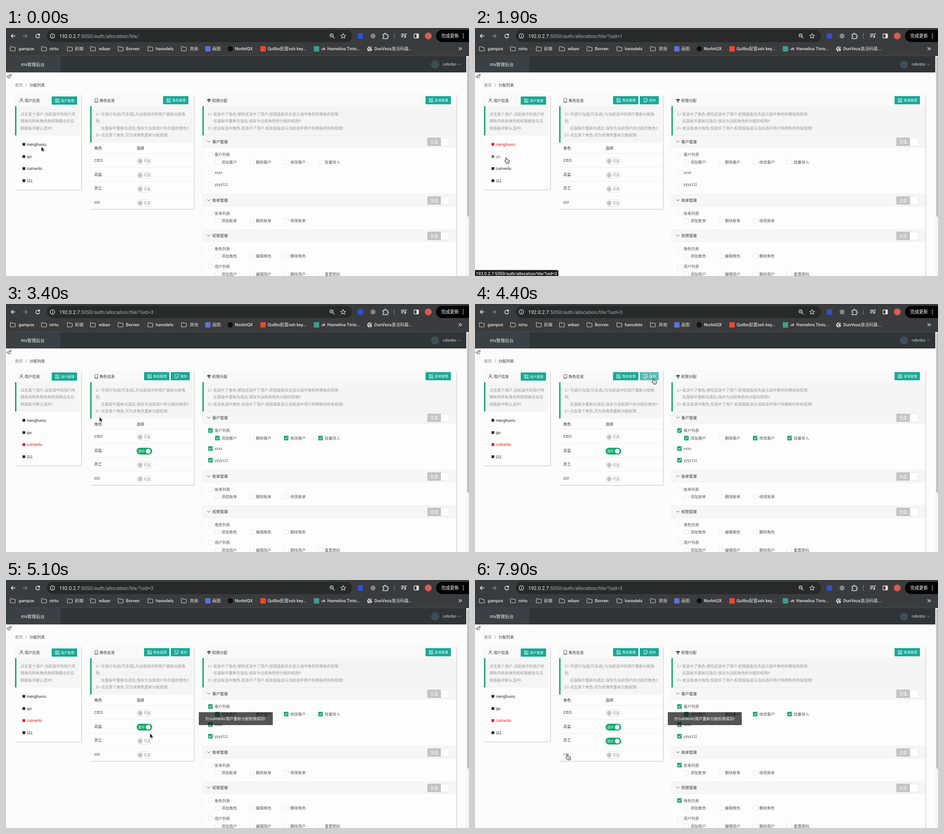
Recreate the animation shown at these times as an HTML page. Size 1023x547 px, loop 8 s.

```html
<!DOCTYPE html>
<html lang="zh">
<head>
<meta charset="utf-8">
<title>分配列表</title>
<style>
html, body { margin: 0; width: 100%; height: 100%; overflow: hidden; background: #fcfcfc; }
svg { display: block; width: 100vw; height: 100vh; }
text { font-family: "Liberation Sans", "Noto Sans CJK SC", "Noto Sans CJK", sans-serif; white-space: pre; }
.ui { font-family: Roboto, "Noto Sans CJK SC", "Noto Sans CJK", sans-serif; }
.card { filter: drop-shadow(1px 1px 1px rgba(0, 0, 0, .22)); }
</style>
</head>
<body>
<svg viewBox="0 0 1023 547" preserveAspectRatio="none">
  <g id="base"></g>
  <g id="live"></g>
  <g id="toast"></g>
  <g id="status"></g>
  <g id="cursor"></g>
</svg>
<script>
const LOOP = 8000;
const HOST = '192.0.2.7', PATH = ':5050/auth/allocation/tile/';
const GREEN = '#16a86b', TEAL = '#17a995', INK = '#333';
const $ = id => document.getElementById(id);

// ---- drawing helpers: each returns SVG markup ----
const text = (x, cy, s, fill = INK, size = 8.5, extra = '') =>
  `<text x="${x}" y="${(cy + size * .37).toFixed(2)}" font-size="${size}" fill="${fill}" ${extra}>${s}</text>`;
const ui = (x, cy, s, fill, size, weight = 500) =>
  text(x, cy, s, fill, size, `class="ui" font-weight="${weight}"`);
const rect = (x, y, w, h, fill, extra = '') =>
  `<rect x="${x}" y="${y}" width="${w}" height="${h}" fill="${fill}" ${extra}/>`;
const dot = (x, y, r, fill, extra = '') =>
  `<circle cx="${x}" cy="${y}" r="${r}" fill="${fill}" ${extra}/>`;
const line = (d, color, w = 1) =>
  `<path d="${d}" fill="none" stroke="${color}" stroke-width="${w}" stroke-linecap="round" stroke-linejoin="round"/>`;

// ---- browser frame ----
function star(cx, cy, r) {
  let d = '';
  for (let i = 0; i < 10; i++) {
    const a = i * Math.PI / 5 - Math.PI / 2, q = i % 2 ? r * .45 : r;
    d += `${i ? 'L' : 'M'}${(cx + q * Math.cos(a)).toFixed(2)} ${(cy + q * Math.sin(a)).toFixed(2)}`;
  }
  return line(d + 'Z', '#ddd', 1.1);
}

function browser() {
  const lite = '#e3e3e3';
  let s = rect(0, 0, 1023, 62, '#3a3b3c') + rect(90, 4, 675, 27, '#282929', 'rx="13.5"');
  s += line('M20 17.5H11.5M15.5 13.5l-4 4 4 4', '#eee', 1.5);
  s += line('M38 17.5H46.5M42.5 13.5l4 4-4 4', '#85868a', 1.4);
  s += dot(102.5, 17.5, 4.9, 'none', `stroke="${lite}" stroke-width="1.2"`);
  s += line('M102.5 17V20M102.5 14.9v.1', lite, 1.2);
  s += dot(719.3, 16.2, 3.4, 'none', `stroke="${lite}" stroke-width="1.2"`);
  s += line('M722 19l3.5 3.5M717.8 16.2h3', lite, 1.2) + star(745, 17.8, 5.8);
  s += rect(777, 11.5, 12, 12, '#2d4fdc', 'rx="3"') + dot(811, 17.5, 5.5, '#858789');
  s += line('M833 14h3.2v-1a1.5 1.5 0 0 1 3 0v1h3.8v3.2h.6a1.5 1.5 0 0 1 0 3h-.6v3.3H833v-3.3a1.7 1.7 0 0 0 0-3.4Z', lite, 1.4);
  s += rect(857.4, 12.5, 1.3, 11, '#77797c');
  s += line('M873.5 13.5h7M873.5 16.5h7M873.5 19.5h4M883 20v-7h2', lite, 1.4) + dot(881.6, 20, 1.7, lite);
  s += rect(901.5, 13, 10, 9, 'none', `rx="1" stroke="${lite}" stroke-width="1.3"`) + rect(907, 13, 4.5, 9, lite);
  s += dot(933, 17.5, 7.6, '#d85d50');
  s += rect(950, 4, 90, 27, '#050505', 'rx="13.5"') + ui(961.5, 17.5, '完成更新', '#fff', 9.8);
  s += [13.5, 17.5, 21.5].map(y => dot(1010.5, y, 1.1, '#fff')).join('');

  const folders = [[9, 28, 'gampos'], [78, 96, 'nirtu'], [135, 152, '前端'], [186, 205, 'wiban'],
    [247, 265, 'Borven'], [313, 331, 'hanodels'], [387, 406, '其他']];
  for (const [x, tx, name] of folders) {
    s += line(`M${x + .5} 42q0-1 1-1h3l1.5 1.5h4.5q1 0 1 1v6q0 1-1 1h-9q-1 0-1-1Z`, '#d0d0d0', 1.1);
    s += ui(tx, 45.8, name, lite, 9.5);
  }
  s += rect(440, 40, 12, 12, '#5c70d8', 'rx="2"') + ui(455.5, 45.8, '画图', lite, 9.5);
  s += dot(495.5, 46, 6, '#111') + ui(506, 45.8, 'NorbitQX', lite, 9.5);
  s += rect(562, 40, 12, 12, '#e8472f', 'rx="1.5"') + ui(578, 45.8, 'Quilbo配置ssh key...', lite, 9.5);
  s += rect(680, 40, 12, 12, '#3f9c8b');
  s += rect(697, 43, 8, 5.5, '#e9dfe0') + [43, 45.2, 47.4].map(y => rect(697, y, 8, 1.1, '#c63b46')).join('') + rect(697, 43, 3.8, 3, '#364a86');
  s += ui(710, 45.8, 'Hamelina Tinto...', lite, 9.5);
  s += dot(803.5, 46, 5.6, '#dcdcdc') + line('M799 44q3 0 3 2t2 2v3M804 41q-1 3 1.5 3t3 2.5', '#3a3b3c', 1.3);
  s += ui(814, 45.8, 'DunVeza激活码最...', lite, 9.5);
  return s + line('M1000.3 43l2.8 2.8-2.8 2.8M1004 43l2.8 2.8-2.8 2.8', lite, 1.2);
}

// ---- page parts ----
const card = (x, y, w, h) =>
  `<g class="card">${rect(x, y, w, h, '#fdfdfd')}</g>` + rect(x, y, w, 25.5, '#f9f9f9');

function tip(x, w, h, rows) {
  let s = rect(x, 172.5, w, h, '#f5f5f5') + rect(x, 172.5, 3, h, GREEN);
  rows.forEach(([dx, str], i) => s += text(x + 12 + dx, 190 + i * 15.3, str, '#969696'));
  return s;
}

const gridIcon = (x, y) => line(
  `M${x} ${y}h3v3h-3ZM${x} ${y + 5}h3v3h-3ZM${x + 5} ${y + 5}h3v3h-3ZM${x + 6.5} ${y - .6}l2 2-2 2-2-2Z`, '#fff', .9);

const button = (x, y, label) => rect(x, y, 56, 18, TEAL, 'rx="1"') + gridIcon(x + 8.5, y + 5.2) +
  text(x + 20.3, y + 9.3, label, '#fff', 7.4, 'font-weight="500"');

function section(y, label) {
  return rect(434, y - 13.3, 561, 26.5, '#f6f6f6') + rect(434, y - 13.6, 561, .7, '#ebebeb') + rect(434, y + 12.8, 561, .7, '#ebebeb') +
    line(`M445 ${y - 1.5}l3 3 3-3`, '#444', 1) + text(456, y, label) +
    rect(931.3, y - 8.3, 48, 17.6, '#fff', 'stroke="#dedede" stroke-width=".8"') +
    rect(931, y - 8.6, 30, 18.2, '#c3c3c3') + text(937, y + .7, '全选', '#fff', 8.8);
}

function page() {
  let s = rect(0, 62, 1017, 36, '#2f3437') + rect(0, 62, 120, 36, '#3a4043') + rect(0, 61, 1023, 1, '#4a4c4e');
  s += text(33, 80, 'RN管理后台', '#f2f2f2', 9.6, 'font-weight="500"');
  s += dot(948, 80.5, 9, '#3d4f55') + text(965, 80, 'rufenbo', '#d5d7d8', 8.8);
  s += line('M999 79l2.7 2.7 2.7-2.7', '#a5a8aa', .9);
  s += rect(1017, 62, 6, 485, '#f5f5f5') + rect(1019, 64, 4.5, 352, '#bfbfbf', 'rx="2"');
  s += line('M1 106.5l11-4.5-2.7 9-3.5-2.3-1.3 2.3-.4-3.3ZM4.2 107.6l7.8-5.6-6.2 6.6', '#555', .8);
  s += text(20, 125.7, '首页', '#777') + text(43.4, 125.7, '/', '#777') + text(52, 125.7, '分配列表');

  s += card(20, 147, 146, 209);
  s += dot(34, 157.7, 2.2, 'none', 'stroke="#444"') + line('M30.5 164q0-4 3.5-4t3.5 4', '#444', .9);
  s += text(41, 160, '用户信息') + button(101, 151, '用户管理');
  s += tip(20, 143, 64.5, [[0, '点击某个用户,当前选中的用户所'], [0, '拥有的所有角色和权限都会在右'], [0, '侧面板中默认选中!']]);

  s += card(186, 147, 229, 252);
  s += rect(196.3, 155.5, 6.6, 9, 'none', 'rx="1" stroke="#444" stroke-width=".9"') + line('M197 162.3h5', '#444', .8);
  s += text(206.5, 160, '角色信息');
  s += tip(186, 227, 80, [[0, '1> 可进行勾选(可多选),为当前选中的用户重新分配角'], [0, '色;'],
    [12, '在面板中重新勾选后,保存为当前用户所分配的角色!!'], [0, '2> 点击某个角色,可为该角色重新分配权限.']]);
  s += text(195, 264.8, '角色', INK, 8.5, 'font-weight="500"') + text(288.5, 264.8, '选择', INK, 8.5, 'font-weight="500"');
  s += [276, 307, 338, 368.5].map(y => rect(186, y, 229, .8, '#ededed')).join('');

  s += card(434, 147, 561, 420);
  s += line('M444.5 159q4-4 8 0ZM448.5 157v6l1.5.8M446.5 161h4', '#333', 1.2);
  s += text(455.5, 160, '权限分配') + button(927, 150.3, '菜单管理');
  s += tip(434, 561, 65, [[0, '1> 若选中了角色,哪怕还选中了用户,权限面板优先显示选中角色所拥有的权限'],
    [12, '在面板中重新勾选后,保存为当前角色所分配的权限!!'], [0, '2> 若没有选中角色,但选中了用户,权限面板显示当前选中用户所拥有的所有权限!']]);
  return s + section(250.5, '客户管理') + section(380, '账单管理') + section(458, '权限管理');
}

// ---- changing parts ----
const USERS = [['menghuoru', 256.5], ['qiv', 283.5], ['cuimenlu', 310], ['111', 336.8]];
const ROLES = [['CEO', 291.5], ['总监', 322.5], ['员工', 353.3], ['zzz', 384]];
// y, parent label, child labels, indexes ticked for the third user, parent rule
const PERMS = [
  [279, '客户列表', ['添加客户', '删除客户', '修改客户', '批量导入'], [0, 2, 3], 'user'],
  [318.7, 'xxxx', [], [], 'user'],
  [344.5, 'yyyy111', [], [], 'user'],
  [408.3, '账单列表', ['添加账单', '删除账单', '修改账单'], [], 'staff'],
  [486.3, '角色列表', ['添加角色', '编辑角色', '删除角色'], [], 'staff'],
  [525.7, '用户列表', ['添加用户', '编辑用户', '删除用户', '重置密码'], [], '']
];

function check(x, y, label, on) {
  return (on ? rect(x, y - 5, 10, 10, GREEN, 'rx="1"') + line(`M${x + 2.3} ${y}l2 2.1 3.6-4`, '#fff', 1.1)
             : rect(x + .4, y - 4.8, 9.4, 9.4, '#fff', 'rx="1" stroke="#dfdfdf" stroke-width=".8"')) +
    text(x + 14.3, y + .2, label, '#555');
}

function toggle(y, on) {
  return on
    ? rect(288.5, y - 7.5, 34.5, 15, GREEN, 'rx="7.5"') + dot(314.3, y, 5.3, '#fff') + text(291.8, y, '选中', '#fff', 7.3)
    : rect(288.9, y - 7.1, 33.8, 14.2, '#fff', 'rx="7.1" stroke="#d8d8d8" stroke-width=".8"') + dot(296.5, y, 5.2, '#c5c5c5') + text(304, y, '可选', '#888', 7.5);
}

function live(st) {
  let s = st.busy ? line('M66.5 14l7 7M73.5 14l-7 7', '#eee', 1.4)
    : line('M73.6 15.2a4.2 4.2 0 1 0 .6 3.6M74.2 12.8v3h-3', '#eee', 1.4);
  const query = st.url ? `?uid=${st.url}` : '';
  s += ui(117.5, 17.6, `${HOST}<tspan fill="#a9abad">${PATH}${query}</tspan>`, '#f2f2f2', 11, 400);
  USERS.forEach(([name, y], i) => {
    const c = st.user === i + 1 ? '#e11a14' : st.overUser === i ? '#777' : '#262626';
    s += rect(36.5, y - 3, 6, 6, c) + text(46, y, name, c);
  });
  s += button(st.user ? 305 : 347, 150.3, '角色管理');
  if (st.user) {
    s += `<g>${rect(364, 150.3, 42, 18, st.overSave ? '#58beb1' : TEAL, 'rx="1"')}` +
      line('M373.5 155.5h7v5l-3 3h-4ZM380.5 160.5h-3v3', '#fff', .9) +
      text(385, 159.6, '保存', '#fff', 7.4, 'font-weight="500"') + '</g>';
  }
  ROLES.forEach(([name, y], i) => {
    s += text(195, y, name, st.overRole === i ? '#888' : INK, 8.5) +
      toggle(y + 2, st.user === 3 && (i === 1 || (i === 2 && st.staffOn)));
  });
  for (const [y, label, kids, ticked, rule] of PERMS) {
    const on = st.user === 3 && (rule === 'user' || (rule === 'staff' && st.saved));
    s += check(446.7, y, label, on);
    kids.forEach((k, i) => s += check(462 + i * 76, y + 16.8, k, st.user === 3 && ticked.includes(i)));
  }
  return s;
}

// ---- pointer ----
const ARROW = '<path d="M0 0V11.2L2.6 8.8 4.4 12.8 6.2 12 4.5 8.1H8Z" fill="#111" stroke="#fff" stroke-width=".8"/>';
const HAND = '<path d="M-1.2 1Q0-.8 1.2 1V5Q2.4 4 3.3 5.3 4.5 4.5 5.4 5.8 7 5.5 7.3 7V9.5Q7 11.5 6 12.8H.3Q-1.2 10.5-3.3 8 -3.6 6.3-1.2 8Z" fill="#fff" stroke="#111" stroke-width="1"/>' +
  line('M1.6 8.3v2.3M3.4 8.3v2.3M5.1 8.3v2.3', '#111', .6);
const STOPS = [[0, 78, 261.5], [400, 78, 261.5], [1000, 66, 253], [1600, 66, 253], [2150, 71, 310], [3000, 71, 310],
  [3900, 394, 164], [4600, 394, 164], [5050, 318, 338], [5150, 318, 338], [5400, 307, 353], [5750, 307, 353],
  [6300, 390, 156], [7250, 390, 156], [7800, 204, 384], [LOOP, 204, 384]];

function pointer(t) {
  const i = STOPS.findIndex(p => p[0] > t), [t0, x0, y0] = STOPS[i - 1], [t1, x1, y1] = STOPS[i];
  const u = (t - t0) / (t1 - t0), k = u * u * (3 - 2 * u);
  return [x0 + (x1 - x0) * k, y0 + (y1 - y0) * k];
}

const within = (t, ...spans) => spans.some(([a, b]) => t >= a && t < b);

function stateAt(t, x, y) {
  const user = t < 1450 ? 0 : t < 2400 ? 1 : 3;
  return {
    user, url: t < 1150 ? 0 : t < 2250 ? 1 : 3,
    busy: within(t, [1150, 1450], [2250, 2400], [4550, 4700], [6500, 6800]),
    staffOn: t >= 5600, saved: t >= 6800,
    overUser: x > 36 && x < 90 ? USERS.findIndex(u => Math.abs(y - u[1]) < 4.9) : -1,
    overRole: x > 194 && x < 212 ? ROLES.findIndex(r => Math.abs(y - r[1]) < 5) : -1,
    overToggle: x > 288 && x < 323 && ROLES.some(r => Math.abs(y - r[1] - 2) < 7.5),
    overSave: user > 0 && x > 364 && x < 406 && y > 150 && y < 168.5
  };
}

function toastAlpha(t) {
  const fade = (a, b) => Math.max(0, Math.min(1, (t - a) / 120, (b - t) / 120));
  return Math.max(fade(4720, 5950), fade(6460, LOOP + 200));
}

$('base').innerHTML = browser() + page();
$('toast').innerHTML = rect(426, 291.5, 163.5, 28.5, '#000', 'rx="1" opacity=".67"') +
  text(440, 306, "为'cuimenlu'用户重新分配权限成功!", '#fff');

let last = '';
function frame() {
  const t = performance.now() % LOOP, [x, y] = pointer(t), st = stateAt(t, x, y);
  const key = JSON.stringify(st);
  if (key !== last) {
    last = key;
    $('live').innerHTML = live(st);
    $('status').innerHTML = st.overUser < 0 ? '' :
      '<path d="M0 534H181q3 0 3 3V547H0Z" fill="#171819" stroke="#55575a" stroke-width=".7"/>' +
      ui(2, 541.3, `${HOST}${PATH}?uid=${st.overUser + 1}`, '#f0f0f0', 9.4);
    const hand = st.overUser >= 0 || st.overRole >= 0 || st.overToggle || st.overSave;
    $('cursor').innerHTML = hand ? HAND : ARROW;
  }
  $('toast').setAttribute('opacity', toastAlpha(t).toFixed(3));
  $('cursor').setAttribute('transform', `translate(${x.toFixed(2)} ${y.toFixed(2)})`);
  requestAnimationFrame(frame);
}
frame();
</script>
</body>
</html>
```
